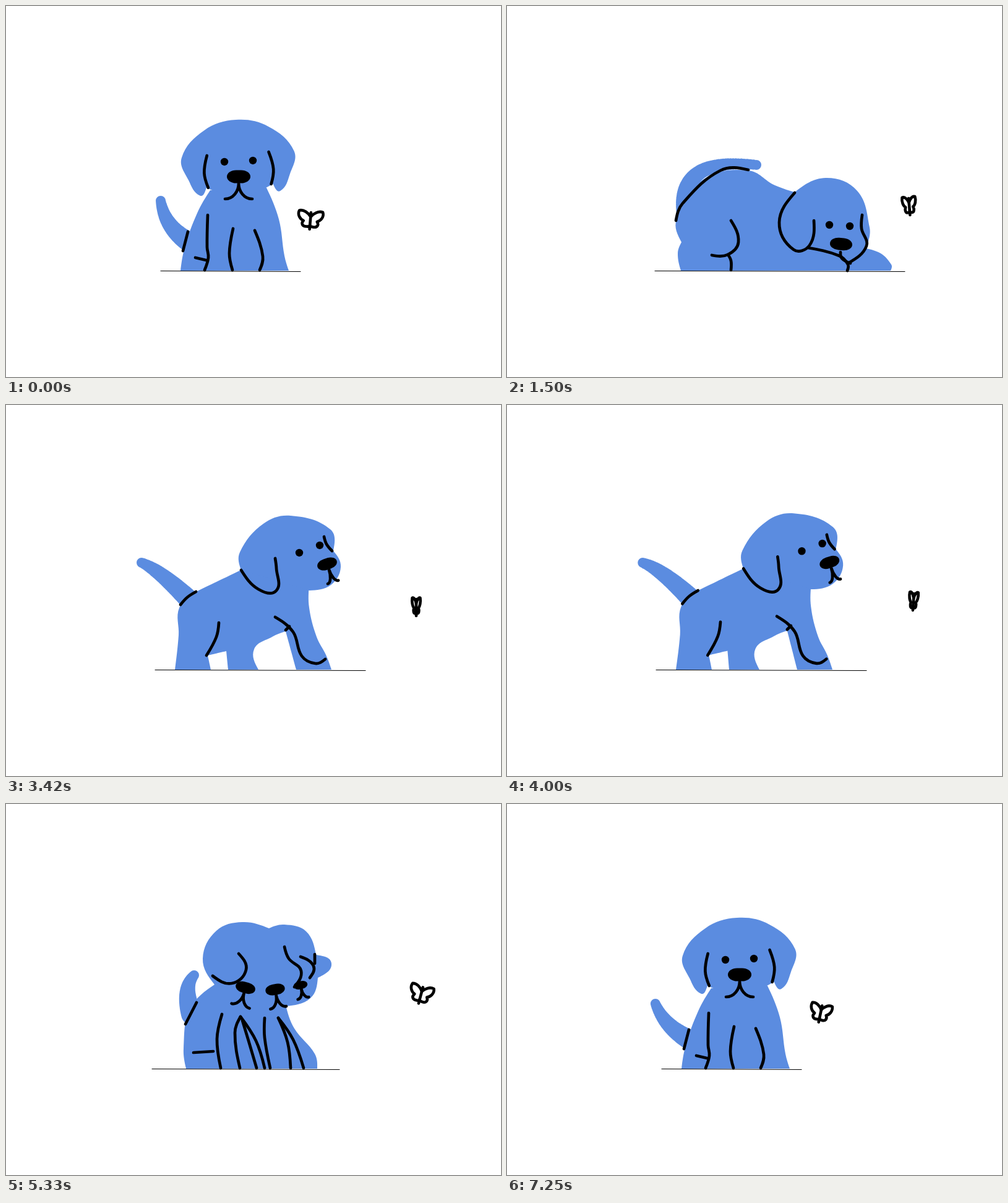
Recreate the animation shown at these times as an HTML page with a canvas. Size 800 px wide and 600 px high, loop 7.33 s.

```html
<!DOCTYPE html>
<html lang="en">
<head>
<meta charset="utf-8">
<title>Puppy and butterfly</title>
<style>
  html, body { margin: 0; width: 100%; height: 100%; overflow: hidden; background: #fff; }
  canvas { display: block; }
</style>
</head>
<body>
<canvas id="stage" width="800" height="600"></canvas>
<script>
const ctx = document.getElementById('stage').getContext('2d');
const BLUE = '#5b8ce0', INK = '#000', FLOOR = 428, LOOP = 7330, FRAMES = 88;

const mix = (a, b, u) => a + (b - a) * u;
const rad = deg => deg * Math.PI / 180;
const between = (p, q, u) => ({ x: mix(p.x, q.x, u), y: mix(p.y, q.y, u) });

function turn([x, y], [ox, oy], deg) {
  const c = Math.cos(rad(deg)), s = Math.sin(rad(deg));
  return [ox + (x - ox) * c - (y - oy) * s, oy + (x - ox) * s + (y - oy) * c];
}

// Key points are "x,y"; a trailing "!" makes a sharp corner.
const parse = text => text.trim().split(/\s+/).map(s => {
  const [x, y] = s.split(',').map(parseFloat);
  return { x, y, sharp: s.endsWith('!') };
});

// Rounded curve through a few key points.
function smooth(pts, closed) {
  const path = new Path2D(), n = pts.length;
  const at = i => pts[(i + n) % n];
  const free = i => at(i).sharp || (!closed && (i === 0 || i === n - 1));
  const handle = (i, toward) => {
    const p = at(i), a = at(i - 1), b = at(i + 1), q = at(i + toward);
    const k = .37 * toward * Math.hypot(q.x - p.x, q.y - p.y) / Math.hypot(b.x - a.x, b.y - a.y);
    return { x: p.x + (b.x - a.x) * k, y: p.y + (b.y - a.y) * k };
  };
  path.moveTo(pts[0].x, pts[0].y);
  for (let i = 0; i < n - !closed; i++) {
    const p = at(i), q = at(i + 1);
    let c = free(i) ? null : handle(i, 1), d = free((i + 1) % n) ? null : handle(i + 1, -1);
    c = c || between(p, d || q, .5);
    d = d || between(q, c, .5);
    path.bezierCurveTo(c.x, c.y, d.x, d.y, q.x, q.y);
  }
  if (closed) path.closePath();
  return path;
}
const blob = text => smooth(parse(text), true);
const strokes = text => text.split('/').map(s => smooth(parse(s), false));

// Both halves of a symmetric shape, given its right half around 0,0.
const flip = pts => pts.map(p => ({ ...p, x: -p.x }));
const mirrored = text => {
  const half = parse(text);
  return smooth([...half, ...flip(half).reverse().filter(p => p.x)], true);
};
function placed(path, x, y, deg) {
  const out = new Path2D();
  out.addPath(path, new DOMMatrix().translate(x, y).rotate(deg));
  return out;
}

const face = path => placed(path, 375, 245, -3.4);
const earLine = parse('50,-6 56,22 51,46');

// tail: root, bend, tip, root radius; muzzles: x, y, tilt, size, mouth spread
const poses = {
  front: {
    tail: [[293, 380], [256, 356], [250, 315], 16], wag: -19, lean: 0,
    fills: [
      blob('330,298! 309,335 289,390 282,428! 457,428! 450,404 441,345 421,294!'),
      face(mirrored('0,-61 52,-47 91,-5 82,32 65,58 54,46! 0,62'))
    ],
    eyes: [[353, 252], [399, 250]], muzzles: [[376, 276, 0, 1, 22]],
    lines: [
      face(smooth(earLine)), face(smooth(flip(earLine))),
      ...strokes('294,365 286,396/326,338 325,390 327,407 321,427/306,407 323,411/367,360 361,400 366,427/402,363 415,405 410,427')
    ],
    ground: [250, 476]
  },
  crouch: {
    tail: [[290, 335], [274, 244], [403, 257], 16], wag: -5, lean: .015,
    fills: [
      blob('281,428! 276,400 282,382! 274,345 318,280 390,266 433,290 480,305! 560,390! 600,398 621,418 620,428!'),
      blob('465,301! 515,278 566,299 586,358 583,384! 556,416 490,391! 463,394 440,350')
    ],
    eyes: [[521, 354], [554, 356]], muzzles: [[540, 385, 5, .95, 0]],
    lines: strokes('390,265 345,266 284,319 273,347/465,302 440,350 463,394 489,387 496,347/486,391 537,404 551,418 550,428/574,338 573,360 581,388 553,415/539,398 541,408 555,416/362,347 374,382 357,402 331,403/357,402 362,412 362,427'),
    ground: [239, 643]
  },
  sit: {
    tail: [[304, 355], [297, 268], [227, 333], 17], wag: -6, lean: .015,
    fills: [
      blob('380,273! 317,326 281,400 284,428! 451,428! 443,401! 447,394! 463,428! 515,428! 510,404 474,347 477,300!'),
      blob('450,179 403,187 368,212 355,253 380,273! 477,303! 533,293 552,264 518,221 492,188')
    ],
    eyes: [[483, 235]], muzzles: [[530, 248, -18, .98, 0]],
    lines: strokes('380,273 403,256 413,244 433,236/318,327 298,352 285,381/369,360 362,391 341,398/341,398 349,411 352,427/387,359 398,427/431,357 440,401/471,343 462,369 447,393'),
    ground: [233, 571]
  },
  stand: {
    tail: [[293, 312], [246, 266], [219, 255], 16], wag: -4, lean: .015,
    fills: [
      blob('390,262! 307,302! 280,328 279,372 273,428! 331,428! 326,405! 356,398! 359,428! 408,428! 401,395 430,375 452,366! 469,428! 526,428! 517,404 502,375 490,328 490,290!'),
      blob('380,267! 378,238 416,192 460,179 524,201 529,236! 541,262 525,291 490,300!')
    ],
    eyes: [[474, 239], [507, 227]], muzzles: [[519, 257, -18, .86, 9]],
    lines: strokes('380,267 408,298 437,300 437,264 435,248/514,213 518,225 527,236/307,302 293,311 282,323/344,352 340,375 324,405/435,343 464,367 478,406 500,418 516,411/458,358 452,364'),
    ground: [241, 581]
  },
  swat: {
    tail: [[277, 376], [212, 337], [230, 286], 19], wag: 10, lean: .01,
    fills: [
      blob('400,270! 378,279! 305,321 273,370 277,398! 274,428! 341,428! 337,419! 351,419! 354,428! 404,428! 398,410! 409,405! 418,428! 475,428! 470,408 449,391! 463,370! 482,305!'),
      blob('448,184 410,197 375,237 378,279! 482,313! 530,309 546,279 523,249 511,211 480,191')
    ],
    paw: blob('463,370! 495,360 533,364 553,345 537,328 482,320!'),
    eyes: [[481, 245], [511, 239]], muzzles: [[517, 272, -12, .88, 11]],
    lines: strokes('379,279 415,308 434,283 433,246/277,353 272,370 278,399/354,375 344,400 325,411/325,411 332,413 336,419/394,357 408,403/431,357 437,376 447,391/479,323 463,370'),
    ground: [233, 573]
  },
  shake: {
    tail: [[300, 340], [285, 297], [304, 277], 17], wag: 3, lean: .02,
    fills: [
      blob('350,270! 337,292! 297,332 287,395 291,428! 503,428! 499,404 466,363 452,325! 452,300!'),
      blob('382,191 340,205 318,250 337,292! 452,327! 492,314 504,281! 526,258 501,244! 485,206 450,195 425,201!')
    ],
    eyes: [], muzzles: [[387, 297, 15, .85, 15], [435, 300, -10, .83, 13], [476, 293, -12, .6, 9]],
    lines: strokes('334,278 365,290 388,268 376,242/450,231 457,250 477,270 466,296/476,247 497,262 491,281/499,243 499,258/308,321 290,356/349,340 341,380 347,427/303,402 335,400/378,427 370,370 379,344/379,344 404,383 418,427/382,350 392,383 405,427/418,346 418,378 427,427/440,346 455,385 460,427/440,346 464,381 481,427'),
    ground: [236, 539]
  }
};

// start, rest frame, pose, stretch
const cuts = [
  [-4, 0, 'front', .05], [14, 18, 'crouch', .02], [28, 31, 'sit', .044], [37, 41, 'stand', .016],
  [49, 55, 'swat', .05], [64, 64, 'shake', 0], [66, 88, 'front', 0]
];

// frame, x, y, tilt, flap cycles
const flight = [
  [0, 492, 345, 5, 0], [10, 500, 342, 8, 2.3], [18, 650, 322, -5, 4.31], [31, 645, 310, -5, 7.69],
  [41, 663, 325, 0, 10.5], [55, 651, 307, 8, 14.39], [64, 671, 307, 15, 16.9],
  [73, 600, 330, -5, 19.2], [87, 507, 337, 12, 22.85], [88, 492, 345, 5, 23]
];
const wing = new Path2D('M0-4C4-10 12-15 19-13C22-6 17 1 11 3C15 8 12 13 5 12C3 12 0 12 0 9');
const torso = new Path2D('M0-11V16');

function ink(paths) {
  for (const p of paths) ctx.stroke(p);
}

// Row of growing discs along a bent line; the tip follows the swing fully, the bend half.
function drawTail([root, bend, tip, thick], angle) {
  const b = turn(bend, root, angle / 2), t = turn(tip, root, angle), steps = 50;
  const along = (j, u) => mix(mix(root[j], b[j], u), mix(b[j], t[j], u), u);
  ctx.beginPath();
  for (let i = 0; i <= steps; i++) {
    const u = i / steps, x = along(0, u), y = along(1, u), r = mix(thick, 8, u);
    ctx.moveTo(x + r, y);
    ctx.arc(x, y, r, 0, 7);
  }
  ctx.fill();
}

function drawMuzzle([x, y, tilt, size, spread]) {
  const deep = 36 * size, top = 11 * size;
  ctx.save();
  ctx.translate(x, y);
  ctx.rotate(rad(tilt));
  ctx.beginPath();
  ctx.roundRect(-19 * size, -10.5 * size, 38 * size, 21 * size, { x: 15 * size, y: 10.5 * size });
  ctx.fill();
  ctx.beginPath();
  for (const side of spread ? [-1, 1] : []) {
    ctx.moveTo(0, top);
    ctx.bezierCurveTo(0, mix(top, deep, .5), side * spread * .4, deep, side * spread, deep);
  }
  ctx.stroke();
  ctx.restore();
}

function drawDog(n) {
  const [start, rest, name, stretch] = cuts.filter(c => c[0] <= n).pop();
  const p = poses[name], age = n - start, beat = (n - rest) * Math.PI / 3;
  const swing = Math.sin(beat);
  const rise = stretch * (1 - Math.cos(beat / 2)) / 2;
  const squash = stretch ? .07 * Math.exp(-1.5 * age) * Math.cos(age) : 0;

  ctx.save();
  ctx.translate(0, FLOOR);
  ctx.transform(1, 0, -p.lean * swing, 1 + rise - squash, 0, 0);
  ctx.translate(0, -FLOOR);

  ctx.fillStyle = BLUE;
  drawTail(p.tail, p.wag * (1 - Math.cos(beat)));
  if (p.paw) {
    const [px, py] = [472, 345];
    ctx.fill(placed(placed(p.paw, -px, -py, 0), px, py, 14 * swing));
  }
  for (const shape of p.fills) ctx.fill(shape);

  ctx.fillStyle = INK;
  ctx.lineWidth = 4.7;
  ink(p.lines);
  p.muzzles.forEach(drawMuzzle);
  for (const [x, y] of p.eyes) {
    ctx.beginPath();
    ctx.arc(x, y, 6.2, 0, 7);
    ctx.fill();
  }
  ctx.restore();

  const [left, right] = p.ground;
  ctx.beginPath();
  ctx.moveTo(left, 428.5);
  ctx.lineTo(right, 429.5);
  ctx.stroke();
}

function drawButterfly(n) {
  const i = flight.findIndex(k => k[0] > n);
  const a = flight[i - 1], b = flight[i], u = (n - a[0]) / (b[0] - a[0]);
  const [, x, y, tilt, flap] = a.map((v, j) => mix(v, b[j], u));
  const open = .67 + .33 * Math.cos(flap * 2 * Math.PI);
  const wings = new Path2D();
  for (const side of [-1, 1]) wings.addPath(wing, new DOMMatrix([side * open, 0, 0, 1, 0, 0]));
  ctx.save();
  ctx.translate(x, y - 8 * Math.sin(u * 2 * Math.PI));
  ctx.rotate(rad(tilt));
  ctx.lineWidth = 4.6;
  ink([wings, torso]);
  ctx.restore();
}

// Twelve drawings a second, each starting on a whole 10 ms.
const startOf = i => Math.round(i * 25 / 3) * 10;
function frameAt(t) {
  const i = Math.min(FRAMES - 1, Math.floor(t * .012 + .5));
  return startOf(i) > t ? i - 1 : i;
}

function tick() {
  const n = frameAt(performance.now() % LOOP);
  ctx.fillStyle = '#fff';
  ctx.fillRect(0, 0, 800, 600);
  ctx.strokeStyle = INK;
  ctx.lineCap = ctx.lineJoin = 'round';
  drawDog(n);
  drawButterfly(n);
  requestAnimationFrame(tick);
}
tick();
</script>
</body>
</html>
```
